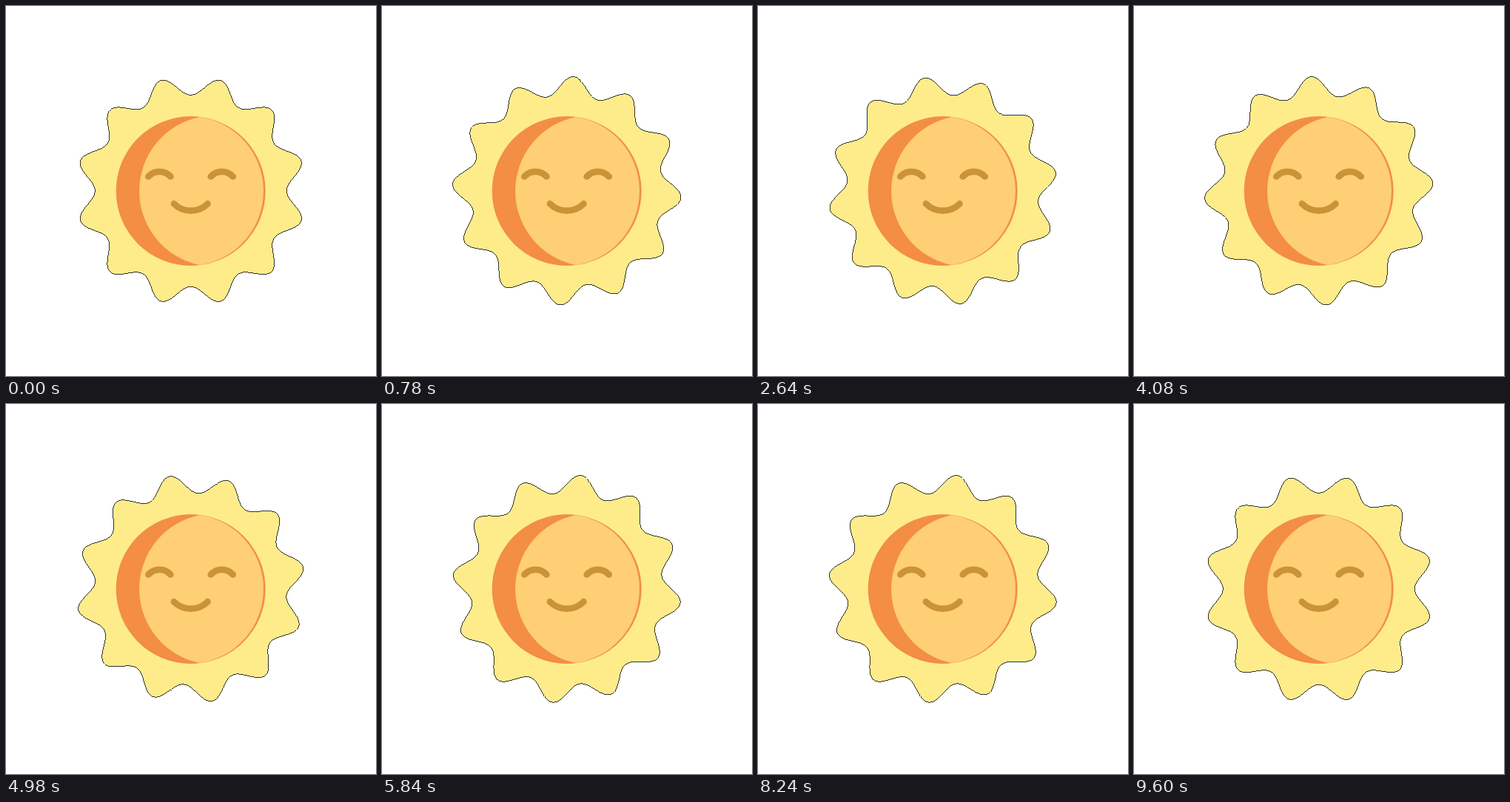
Animation of 500x500 px, one loop 9640 ms. Source, as an HTML page:

```html
<!DOCTYPE html>
<html lang="en">
<head>
<meta charset="utf-8">
<title>Smiling sun</title>
<style>
  html, body { margin: 0; width: 100%; height: 100%; overflow: hidden; background: #fff; }
  svg { display: block; width: 100%; height: 100%; }
  #rays { fill: #feec8b; stroke: #000; stroke-width: 0.8; shape-rendering: crispEdges; }
  .face { fill: none; stroke: #cb9337; stroke-width: 8.7; stroke-linecap: round; }
</style>
</head>
<body>
<svg viewBox="0 0 500 500">
  <path id="rays"/>
  <circle cx="249.7" cy="250" r="101" fill="#f38e44"/>
  <path fill="#fecf74" d="M262 150A102 102 0 0 0 262 350A101.15 101.15 0 0 0 262 150Z"/>
  <g class="face">
    <path d="M192.4 230.5A20.1 20.1 0 0 1 222.4 230.5"/>
    <path d="M276.7 230.5A20.1 20.1 0 0 1 306.7 230.5"/>
    <path d="M227 267.2A32 32 0 0 0 272.5 267.2"/>
  </g>
</svg>
<script>
const LOOP = 9640, END = 9600, STEP = 20;
const HALF = 1200, SWING = 23;
const CENTER = 249.75;
const rays = document.getElementById('rays');

// Wavy outline with twelve rounded tips
function raysPath() {
  const points = [];
  for (let i = 0; i < 720; i++) {
    const a = i * Math.PI / 360;
    const wave = 12 * a;
    const r = 141.2 - 12.5 * Math.cos(wave) + 0.8 * Math.cos(2 * wave);
    const x = CENTER + r * Math.sin(a), y = CENTER - r * Math.cos(a);
    points.push(x.toFixed(2) + ' ' + y.toFixed(2));
  }
  return 'M' + points.join('L') + 'Z';
}

const bezier = (a, b, t) => 3 * a * t * (1 - t) ** 2 + 3 * b * t * t * (1 - t) + t ** 3;

// Linear start, soft landing
function ease(x) {
  let lo = 0, hi = 1;
  for (let i = 0; i < 30; i++) {
    const mid = (lo + hi) / 2;
    if (bezier(1 / 6, 2 / 3, mid) < x) lo = mid; else hi = mid;
  }
  return bezier(1 / 6, 1, (lo + hi) / 2);
}

function angleAt(ms) {
  const t = Math.min(Math.floor(ms % LOOP / STEP) * STEP, END) % (2 * HALF);
  return t < HALF ? SWING * ease(t / HALF) : SWING * (1 - ease((t - HALF) / HALF));
}

function draw(ms) {
  rays.setAttribute('transform', `rotate(${angleAt(ms).toFixed(3)} ${CENTER} ${CENTER})`);
}

rays.setAttribute('d', raysPath());
draw(0);
const start = performance.now();
requestAnimationFrame(function tick() {
  draw(performance.now() - start);
  requestAnimationFrame(tick);
});
</script>
</body>
</html>
```
